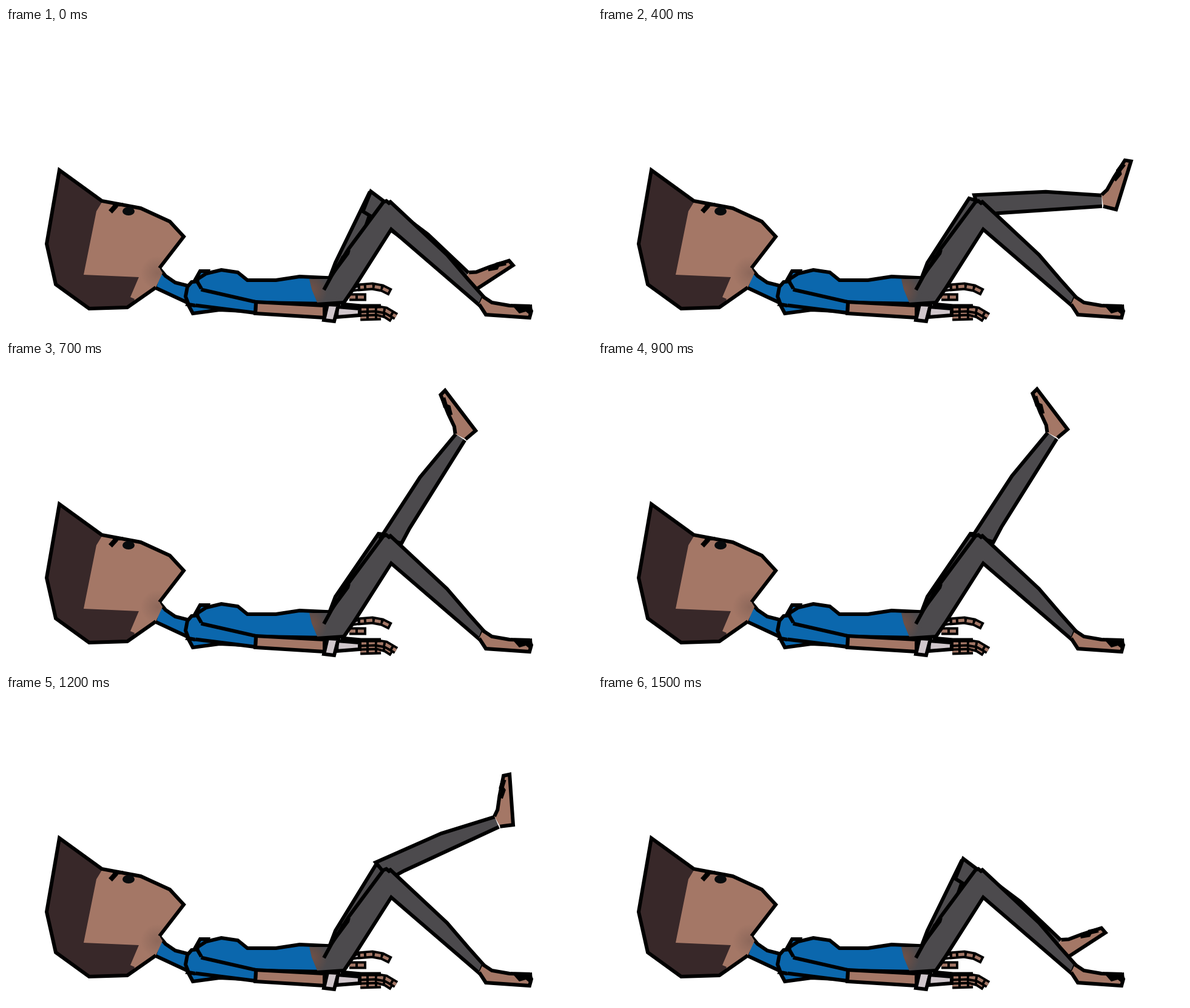
An HTML page with a canvas that plays this animation: 966x506 px, repeating every 1.6 s.

```html
<!DOCTYPE html>
<html lang="en">
<head>
<meta charset="utf-8">
<title>Leg raise</title>
<style>
html, body { margin: 0; width: 100%; height: 100%; overflow: hidden; background: #fff; }
canvas { display: block; }
</style>
</head>
<body>
<canvas id="stage" width="966" height="506"></canvas>
<script>
const ctx = document.getElementById('stage').getContext('2d');
const SKIN = '#a47766', HAIR = '#382829', BLUE = '#0b67ad', PANTS = '#4c4a4d', CUFF = '#cfc6cb', INK = '#000';
const LOOP = 1600, STEP = 100, LINE = 6;

const mix = (a, b, u) => a + (b - a) * u;
const ease = u => u * u * (3 - 2 * u);
const ramp = (t, start, end) => ease(Math.min(1, Math.max(0, (t - start) / (end - start))));

function path(points) {
  ctx.beginPath();
  for (let i = 0; i < points.length; i += 2) ctx.lineTo(points[i], points[i + 1]);
}
function fill(color, ...points) {
  path(points);
  ctx.fillStyle = color;
  ctx.fill();
}
function line(width, ...points) {
  path(points);
  ctx.lineWidth = width;
  ctx.stroke();
}
// Filled shape whose last edge stays without a line.
function open(color, width, ...points) {
  fill(color, ...points);
  ctx.lineWidth = width;
  ctx.stroke();
}
function closed(color, width, ...points) {
  fill(color, ...points);
  ctx.closePath();
  ctx.lineWidth = width;
  ctx.stroke();
}
function glow(x, y, radius, rgb, alpha) {
  const g = ctx.createRadialGradient(x, y, 0, x, y, radius);
  g.addColorStop(0, `rgba(${rgb},${alpha})`);
  g.addColorStop(1, `rgba(${rgb},0)`);
  return g;
}
// Black strand with skin segments between dark joints.
function finger(...points) {
  line(13, ...points);
  ctx.save();
  ctx.strokeStyle = SKIN;
  ctx.setLineDash([10, 4]);
  line(5, ...points);
  ctx.restore();
}

// Sink slightly, kick up, hold, come back down.
function shinAngle(t) {
  const sink = 38 + 4 * ramp(t, 0, 140);
  const raised = mix(sink, -56, ramp(t, 140, 700));
  return mix(raised, 38, ramp(t, 1000, 1500));
}

function farLeg(t) {
  const turn = 2 * Math.PI / LOOP;
  const swing = Math.cos((t - 760) * turn);
  const kneeX = 618 + 19 * swing + 10 * (1 - swing * swing);
  const kneeY = 289 + 3 * Math.sin(t * turn);
  const lift = kneeX - 600;

  closed(PANTS, LINE, 527, 430, 543, 388, 600 + lift * 0.38, 271 + lift * 0.35,
    kneeX + 8, kneeY - 2, kneeX, kneeY + 20, 560, 425);

  ctx.save();
  ctx.translate(kneeX, kneeY);
  ctx.rotate(shinAngle(t) * Math.PI / 180);
  open(PANTS, LINE, 200, 9, 28, 15, 0, 18, -10, -16, 108, -18, 200, -9);
  open(SKIN, LINE, 200, -10, 209, -18, 221, -38, 240, -66, 250, -64, 223, 15, 202, 9);
  line(8, 238, -60, 229, -49, 230, -44, 221, -34);
  ctx.restore();
}

function farHand() {
  finger(566, 445, 594, 445);
  finger(580, 429, 604, 427, 620, 430, 634, 437);
  closed(CUFF, 4, 568, 429, 582, 427, 582, 433, 566, 435);
}

function nearLeg() {
  fill(PANTS, 500, 415, 530, 415, 557, 455, 513, 454, 504, 432);
  fill(glow(500, 434, 30, '140,85,65', 0.65), 500, 415, 530, 415, 534, 453, 513, 454, 504, 432);
  open(PANTS, LINE, 524, 433, 536, 411, 565, 365, 622, 288, 627, 286, 633, 291, 632, 286,
    727, 375, 762, 416, 787, 444, 781, 459, 635, 333, 572, 432, 557, 454);
  line(LINE, 557, 454, 513, 457);
  fill(INK, 527, 426, 543, 397, 553, 377, 568, 367, 566, 374, 552, 393);

  open(SKIN, LINE, 786, 444, 801, 454, 830, 459, 862, 460, 866, 468, 863, 479, 791, 474, 780, 457);
  fill(INK, 832, 456, 846, 460, 867, 457, 868, 472, 863, 474, 857, 469, 846, 472);
}

function torso() {
  closed(BLUE, LINE, 311, 418, 320, 402, 333, 402, 329, 415);
  closed(BLUE, LINE, 298, 453, 308, 472, 352, 466, 412, 469, 400, 451);
  closed(BLUE, LINE, 316, 415, 330, 406, 355, 400, 382, 404, 398, 417, 445, 417, 484, 411,
    530, 413, 530, 456, 412, 454, 312, 440);
  closed(BLUE, LINE, 254, 399, 263, 410, 279, 421, 303, 427, 303, 456, 245, 429);
}

function nearArm() {
  closed(SKIN, LINE, 412, 453, 525, 459, 525, 479, 411, 472);
  closed(BLUE, LINE, 315, 431, 412, 453, 411, 471, 300, 457);
  open(BLUE, LINE, 312, 459, 301, 457, 296, 444, 299, 428, 306, 420, 315, 419, 322, 431);
  fill(BLUE, 300, 440, 308, 424, 314, 424, 322, 437, 322, 456, 303, 453);

  finger(584, 478, 618, 477);
  finger(584, 471, 612, 470, 626, 474, 637, 481);
  finger(584, 465, 608, 464, 626, 467, 643, 477);
  closed(CUFF, LINE, 546, 461, 583, 464, 583, 475, 545, 478);
  closed(CUFF, LINE, 530, 457, 548, 458, 541, 485, 524, 483);
  line(7, 552, 457, 585, 460, 618, 460);
}

function head() {
  const outline = [253, 397, 293, 345, 270, 320, 222, 298, 158, 286, 88, 235,
    67, 357, 82, 424, 137, 464, 200, 462, 247, 429];
  fill(SKIN, ...outline, 258, 405);
  ctx.save();
  ctx.clip();
  fill(HAIR, 160, 285, 149, 303, 128, 408, 219, 412, 205, 445, 212, 448, 200, 480, 50, 480, 50, 220, 88, 220);
  fill(glow(250, 405, 28, '90,70,65', 0.3), 215, 375, 280, 375, 280, 435, 215, 435);
  ctx.restore();
  line(LINE, ...outline);

  line(8, 172, 304, 182, 293);
  line(LINE, 176, 292, 193, 292);
  ctx.beginPath();
  ctx.ellipse(202, 303, 10, 7, 0, 0, Math.PI * 2);
  ctx.fillStyle = '#080b0d';
  ctx.fill();
}

function draw() {
  const t = Math.floor(performance.now() % LOOP / STEP) * STEP;
  ctx.fillStyle = '#fff';
  ctx.fillRect(0, 0, 966, 506);
  ctx.strokeStyle = INK;
  ctx.lineJoin = 'miter';
  ctx.miterLimit = 2;
  farLeg(t);
  farHand();
  torso();
  nearLeg();
  nearArm();
  head();
  requestAnimationFrame(draw);
}
draw();
</script>
</body>
</html>
```
